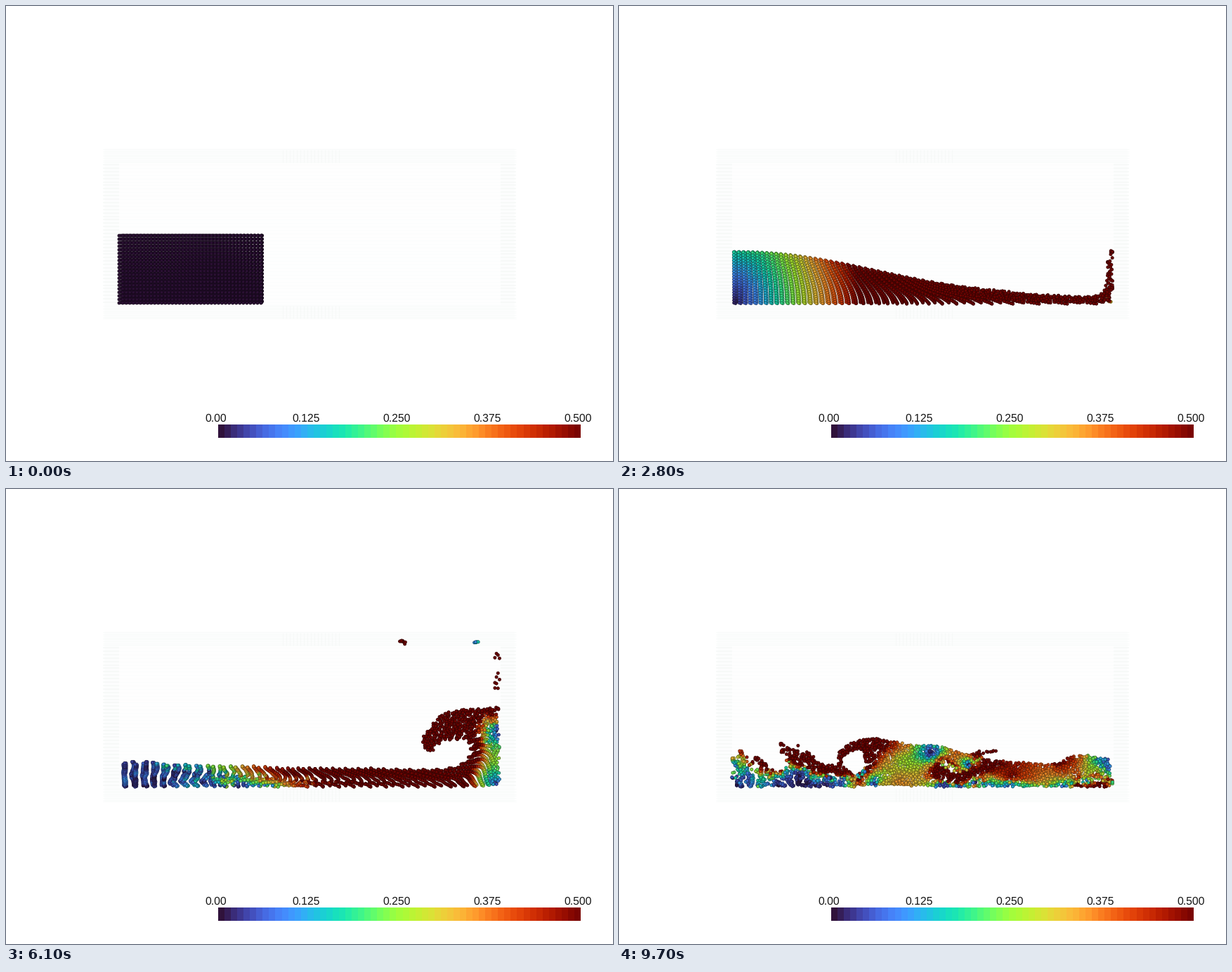
Recreate the animation shown at these times as a matplotlib script. Size 864 px wide and 648 px high, loop 9800 ms.

```python
import numpy as np
import matplotlib.pyplot as plt
from matplotlib.animation import FuncAnimation
from matplotlib.collections import LineCollection
from matplotlib.patches import Rectangle

plt.rcParams["text.hinting"] = "none"

W, H = 864, 648
FRAMES, INTERVAL = 98, 100
turbo = plt.get_cmap("turbo")

# Tank in units of the water depth, gravity 1, one time unit per second
NX, NY = 108, 42
CELL = 5.366 / NX
SIZE = np.array([NX, NY]) * CELL
DAM_COLS, DAM_ROWS = 41, 20
SUBSTEPS = 5
DT = INTERVAL / 1000 / SUBSTEPS
FLIP = .97
TOP_SPEED = .5

# Screen placement
SCALE = 101.6
ORIGIN = np.array([158.5, 425.5])
CENTRE = np.array([W / 2, H / 2])

FACES = (((NX + 1, NY), (0, .5)), ((NX, NY + 1), (.5, 0)))

# Open sides of each cell
SIDES = np.full((NX, NY), 4.)
SIDES[[0, -1]] -= 1
SIDES[:, [0, -1]] -= 1


def along(axis, before, after):
    widths = [(0, 0), (0, 0)]
    widths[axis] = (before, after)
    return widths


def stencil(pos, shape, offset):
    """Bilinear grid indices and weights for every particle."""
    g = np.clip(pos / CELL - offset, 0, np.array(shape) - 1.001)
    i = g.astype(int)
    fx, fy = (g - i).T
    base = i[:, 0] * shape[1] + i[:, 1]
    index = np.stack([base, base + 1, base + shape[1], base + shape[1] + 1])
    weight = np.stack([(1 - fx) * (1 - fy), (1 - fx) * fy, fx * (1 - fy), fx * fy])
    return index, weight


def splat(index, weight, shape):
    size = shape[0] * shape[1]
    return np.bincount(index.ravel(), weight.ravel(), size).reshape(shape)


def laplace(q, fluid):
    out = SIDES * q
    out[1:] -= q[:-1]
    out[:-1] -= q[1:]
    out[:, 1:] -= q[:, :-1]
    out[:, :-1] -= q[:, 1:]
    return out * fluid


def solve_pressure(rhs, fluid, q):
    """Conjugate gradients, started from the last pressure."""
    q = q * fluid
    r = rhs * fluid - laplace(q, fluid)
    d, rr = r.copy(), np.sum(r * r)
    for _ in range(120):
        if rr < 1e-6:
            break
        ad = laplace(d, fluid)
        a = rr / np.sum(d * ad)
        q += a * d
        r -= a * ad
        last, rr = rr, np.sum(r * r)
        d = r + rr / last * d
    return q


def advance(pos, vel, q):
    vel[:, 1] -= DT
    cell = (pos / CELL).astype(int)
    fluid = np.zeros((NX, NY), bool)
    fluid[cell[:, 0], cell[:, 1]] = True

    grids, before, stencils = [], [], []
    for axis, (shape, offset) in enumerate(FACES):
        index, weight = stencil(pos, shape, offset)
        mass = splat(index, weight, shape)
        grid = splat(index, weight * vel[:, axis], shape) / np.maximum(mass, 1e-9)
        before.append(grid.copy())
        np.moveaxis(grid, axis, 0)[[0, -1]] = 0
        grids.append(grid)
        stencils.append((index, weight))

    # Crowded cells are allowed to expand a little
    crowd = splat(*stencil(pos, (NX, NY), .5), (NX, NY)) / 4 - 1
    expand = .1 * np.clip(crowd, 0, .5) * CELL / DT
    div = sum(np.diff(grid, axis=axis) for axis, grid in enumerate(grids))
    q = solve_pressure(expand - div, fluid, q)

    drift = np.empty_like(vel)
    for axis, (index, weight) in enumerate(stencils):
        grid = grids[axis]
        grid -= np.pad(np.diff(q, axis=axis), along(axis, 1, 1))
        valid = np.pad(fluid, along(axis, 0, 1)) | np.pad(fluid, along(axis, 1, 0))
        share = weight * valid.ravel()[index]
        share = share / np.maximum(share.sum(0), 1e-9)
        drift[:, axis] = (share * grid.ravel()[index]).sum(0)
        change = (share * (grid - before[axis]).ravel()[index]).sum(0)
        vel[:, axis] = FLIP * (vel[:, axis] + change) + (1 - FLIP) * drift[:, axis]

    margin = .25 * CELL
    pos = np.clip(pos + DT * drift, margin, SIZE - margin)
    return pos, vel, q


# Four particles per cell, each one in its own depth layer
col, level = [a.ravel() for a in np.meshgrid(
    np.arange(DAM_COLS), np.arange(DAM_ROWS), indexing="ij")]
middle = (np.column_stack([col, level]) + .5) * CELL
CORNERS = np.array([(x, y) for x in (-.25, .25) for y in (-.25, .25)]) * CELL
OFFSET = np.repeat(CORNERS, len(middle), axis=0)
START = np.tile(middle, (4, 1)) + OFFSET
DEPTH = np.repeat(np.linspace(.976, 1, 4), len(middle))[:, None]


def simulate():
    pos, vel, q = START.copy(), np.zeros_like(START), np.zeros((NX, NY))
    for _ in range(FRAMES):
        yield pos.copy(), np.hypot(*vel.T)
        for _ in range(SUBSTEPS):
            pos, vel, q = advance(pos, vel, q)


def project(pos, t):
    # Layers start lined up behind each other and spread as the water mixes
    pos = pos - OFFSET * max(0, 1 - t / 2.5)
    screen = ORIGIN + pos * [SCALE, -SCALE]
    return CENTRE + (screen - CENTRE) * DEPTH


def draw_tank(ax):
    def box(x0, y0, x1, y1, color):
        ax.add_patch(Rectangle((x0, y0), x1 - x0, y1 - y0, color=color, lw=0))

    def lines(segments, color, width):
        ax.add_collection(LineCollection(segments, colors=color, linewidths=width))

    box(140, 203, 724, 446, "#fcfdfd")
    box(161, 224, 704, 425, "#fefefe")
    bands = [*np.arange(204, 224, 2.6), *np.arange(427, 447, 2.6)]
    lines([[(138, y), (726, y)] for y in bands], "#f9fbfa", 1)
    inner = np.arange(226, 425, 4.9)
    lines([[(161, y), (704, y)] for y in inner], "#fbfcfc", 1)
    for x0, x1 in ((138, 161), (704, 726)):
        lines([[(x0, y), (x1, y)] for y in inner], "#f7f9f8", 1.6)
    for y0, y1 in ((205, 223), (427, 445)):
        lines([[(x, y0), (x, y1)] for x in np.arange(394, 476, 5)], "#f6f8f7", 1)


def draw_scale(ax):
    ax.imshow(turbo(np.linspace(0, 1, 57))[None], extent=(302, 817.5, 615, 596),
              aspect="auto", interpolation="nearest")
    for i, label in enumerate(("0.00", "0.125", "0.250", "0.375", "0.500")):
        ax.text(298.5 + 129 * i, 591.5, label, ha="center", va="baseline",
                fontsize=15.8, family="Liberation Sans", color="#161616")


fig = plt.figure(figsize=(W / 72, H / 72), dpi=72, facecolor="white")
ax = fig.add_axes([0, 0, 1, 1])
draw_tank(ax)
draw_scale(ax)
dots = ax.scatter([], [], s=4.1 ** 2, linewidths=.8, zorder=5)
ax.set(xlim=(0, W), ylim=(H, 0))
ax.set_autoscale_on(False)
ax.axis("off")

states = list(simulate())


def update(i):
    pos, speed = states[i]
    rgb = turbo(np.clip(speed / TOP_SPEED, 0, 1))[:, :3]
    dots.set_offsets(project(pos, i * INTERVAL / 1000))
    dots.set_facecolors(rgb * .88)
    dots.set_edgecolors(rgb * .45)
    return [dots]


anim = FuncAnimation(fig, update, frames=FRAMES, interval=INTERVAL,
                     repeat=True, repeat_delay=0, blit=False)
plt.show()
```
